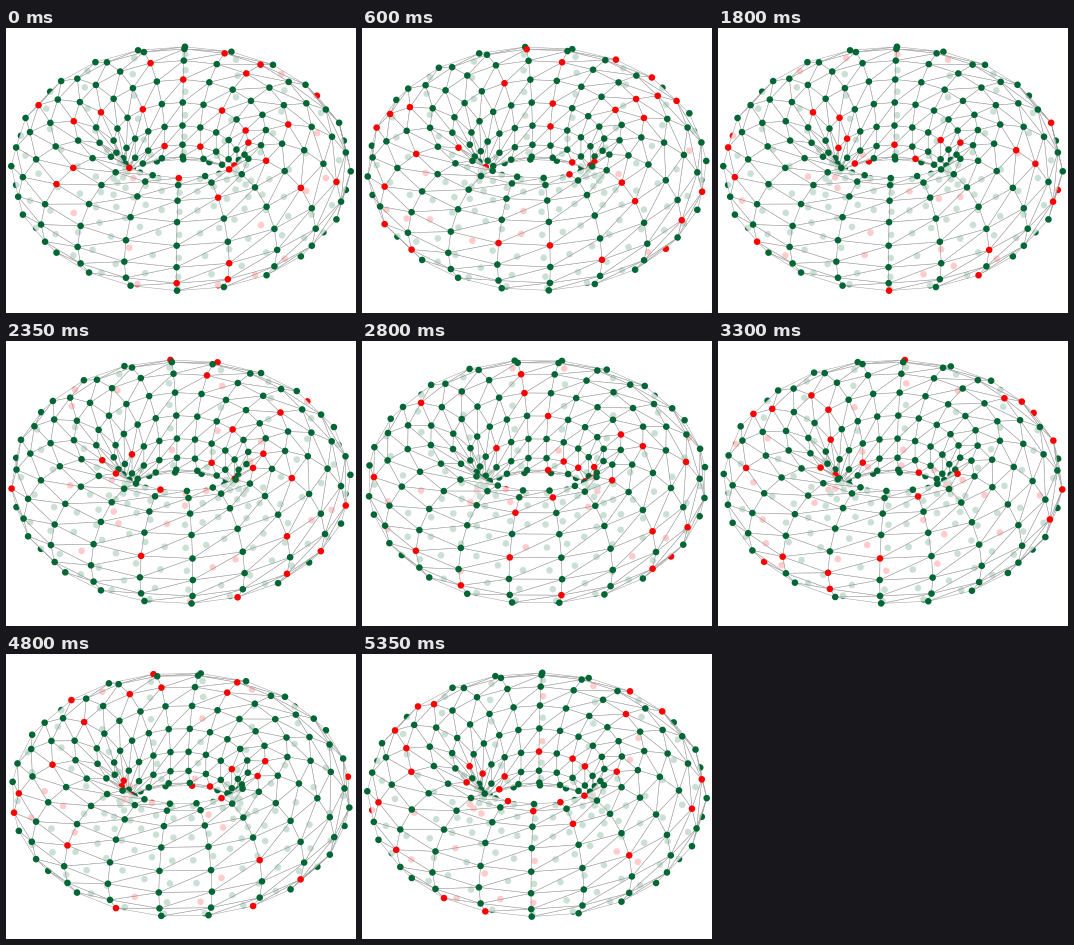
Animation of 350 by 285 pixels, one loop 5.4 s. Source, as a matplotlib script:

```python
import numpy as np
import matplotlib.pyplot as plt
from matplotlib.animation import FuncAnimation
from matplotlib.collections import PolyCollection

W, H, DPI = 350, 285, 100
FRAMES, STEP_MS = 108, 50
NU, NV = 20, 15                    # meridians, points round the tube
BIG, TUBE = 113.2, 56.6            # torus radii in px
CX, CY = 175, 140.7
TILT = np.radians(35.5)
DOT_R = 3.3
RED_SHARE = 0.15

GREEN, RED = (0, 0.4, 0.2, 1), (1, 0, 0, 1)
VEIL = (1, 1, 1, 0.8)
EDGE = (0.62, 0.62, 0.62, 1)
CLEAR = (0, 0, 0, 0)
PX = 72 / DPI

turn = np.linspace(0, 2 * np.pi, 20, endpoint=False)
disc = DOT_R * np.column_stack([np.cos(turn), np.sin(turn)])


def vertex(i, j):
    return (i % NU) * NV + j % NV


def build_mesh():
    tris = []
    for i in range(NU):
        for j in range(NV):
            a, b = vertex(i, j), vertex(i + 1, j)
            c, d = vertex(i + 1, j + 1), vertex(i, j + 1)
            tris += [(a, b, c), (a, c, d)]
    return np.array(tris)


TRIS = build_mesh()


def project(spin):
    """Screen positions and nearness of all vertices."""
    u, v = np.meshgrid(np.arange(NU) * 2 * np.pi / NU + spin,
                       np.arange(NV) * 2 * np.pi / NV, indexing="ij")
    rho = BIG + TUBE * np.cos(v)
    x, y, z = rho * np.sin(u), rho * np.cos(u), TUBE * np.sin(v)
    sx = CX + x
    sy = CY + y * np.sin(TILT) - z * np.cos(TILT)
    near = y * np.cos(TILT) + z * np.sin(TILT)
    return np.column_stack([sx.ravel(), sy.ravel()]), near.ravel()


def front_faces(pts):
    p, q, r = (pts[TRIS[:, k]] for k in range(3))
    e, f = q - p, r - p
    return TRIS[e[:, 0] * f[:, 1] - e[:, 1] * f[:, 0] < 0]


fig = plt.figure(figsize=(W / DPI, H / DPI), dpi=DPI, facecolor="white")
ax = fig.add_axes([0, 0, 1, 1])
ax.set_xlim(0, W)
ax.set_ylim(H, 0)
ax.axis("off")
mesh = PolyCollection([], joinstyle="round")
ax.add_collection(mesh, autolim=False)


def draw(n):
    pts, near = project(np.radians(-1.5 + 0.5 * n))
    faces = front_faces(pts)
    depth = near[faces].mean(axis=1)

    # a dot comes just after the nearest visible face that touches it
    dot_key = np.full(len(pts), -np.inf)
    for k in range(3):
        np.maximum.at(dot_key, faces[:, k], depth + 0.01)
    hidden = np.isinf(dot_key)
    dot_key[hidden] = near[hidden] - 1000

    red = np.random.default_rng(700 + n).random(len(pts)) < RED_SHARE
    items = [(d, pts[f], VEIL, EDGE, 0.5 * PX) for d, f in zip(depth, faces)]
    items += [(k, p + disc, RED if r else GREEN, CLEAR, 0)
              for k, p, r in zip(dot_key, pts, red)]
    items.sort(key=lambda item: item[0])

    _, polys, fills, edges, widths = zip(*items)
    mesh.set_verts(polys)
    mesh.set_facecolor(fills)
    mesh.set_edgecolor(edges)
    mesh.set_linewidth(widths)
    return [mesh]


anim = FuncAnimation(fig, draw, frames=FRAMES, interval=STEP_MS,
                     repeat=True, repeat_delay=0, blit=False)
plt.show()
```
